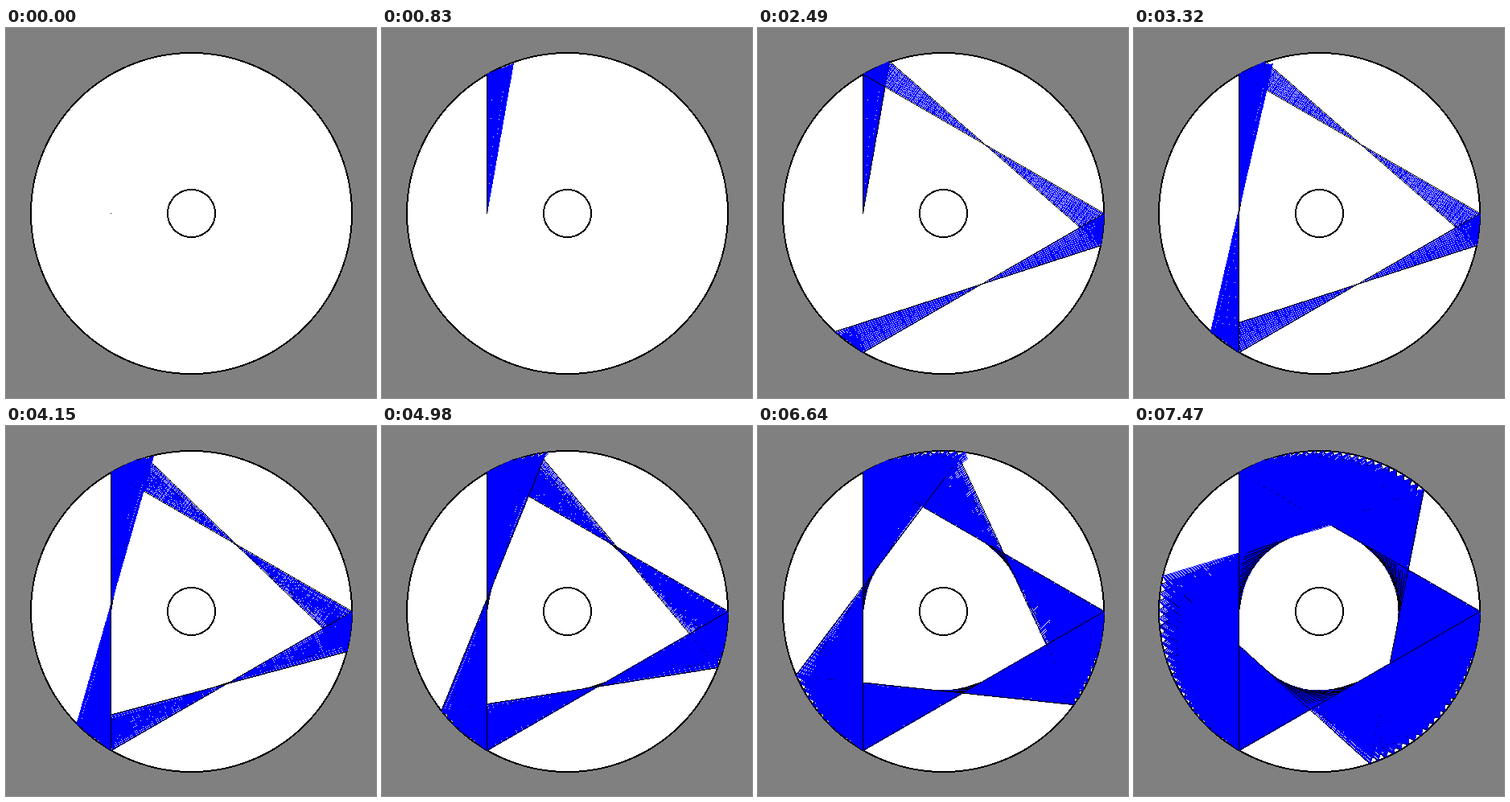
Animation, 460 px wide and 460 px high, one loop 8.3 s. Source, as an HTML page with a canvas:

```html
<!DOCTYPE html>
<html lang="en">
<head>
<meta charset="utf-8">
<title>Circular billiard</title>
<style>
  html, body { margin: 0; width: 100%; height: 100%; overflow: hidden; background: #808080; }
  canvas { display: block; width: 460px; height: 460px; }
</style>
</head>
<body>
<canvas id="stage" width="460" height="460"></canvas>
<script>
const SIZE = 460, CENTER = 230, RADIUS = 200, INNER = 30;
const STILL_MS = 830;
const WALL_REST = 20; // steps a ball rests at the wall before it leaves again
// Simulated steps reached in each still of the loop.
const STEPS = [0, 189, 592, 932, 1290, 2399, 4632, 7953, 10160, 23288];
const GRAY = 0xff808080, WHITE = 0xffffffff, BLACK = 0xff000000, BLUE = 0xffff0000; // ABGR

const ctx = document.getElementById('stage').getContext('2d');
const image = ctx.createImageData(SIZE, SIZE);
const pixels = new Uint32Array(image.data.buffer);

function plot(x, y, color) {
  pixels[y * SIZE + x] = color;
}

function line(a, b, color) {
  let [x, y] = a;
  const dx = Math.abs(b[0] - x), dy = -Math.abs(b[1] - y);
  const sx = x < b[0] ? 1 : -1, sy = y < b[1] ? 1 : -1;
  let err = dx + dy;
  for (;;) {
    plot(x, y, color);
    if (x === b[0] && y === b[1]) return;
    const twice = 2 * err;
    if (twice >= dy) { err += dy; x += sx; }
    if (twice <= dx) { err += dx; y += sy; }
  }
}

// A ball that leaves (-100, 0) at a given tilt from vertical and bounces inside the circle.
function makeBall(tilt) {
  const sin = Math.sin(tilt), cos = Math.cos(tilt), startX = -RADIUS / 2;
  const first = -startX * sin + Math.sqrt((startX * sin) ** 2 + RADIUS ** 2 - startX ** 2);
  const firstAngle = Math.atan2(first * cos, startX + first * sin);
  const turn = 2 * Math.acos(cos / 2);
  const chord = 2 * RADIUS * Math.sin(turn / 2);
  const period = chord + WALL_REST;
  const toPixel = (x, y) => [Math.round(CENTER + x), Math.round(CENTER - y)];

  // Point on the chord that starts at bounce k; part runs from 0 to 1.
  function onChord(k, part) {
    const from = firstAngle - k * turn, to = from - turn;
    const mix = f => RADIUS * (f(from) * (1 - part) + f(to) * part);
    return toPixel(mix(Math.cos), mix(Math.sin));
  }

  return {
    bounces: 0,
    bouncesAt: step => step < first ? 0 : Math.floor((step - first) / period) + 1,
    corner: n => n ? onChord(n - 1, 0) : toPixel(startX, 0),
    at(step) {
      if (step < first) return toPixel(startX + step * sin, step * cos);
      const k = Math.floor((step - first) / period);
      const moved = Math.max(0, step - first - k * period - WALL_REST);
      return onChord(k, moved / chord);
    }
  };
}

const balls = [makeBall(0), makeBall(Math.PI / 18)];

function drawTable() {
  const onRing = (r, radius) => r > radius - 1.5 && r < radius + 0.5;
  for (let y = 0; y < SIZE; y++) {
    for (let x = 0; x < SIZE; x++) {
      const r = Math.hypot(x - CENTER, y - CENTER);
      const rim = onRing(r, RADIUS) || onRing(r, INNER);
      plot(x, y, rim ? BLACK : r > RADIUS ? GRAY : WHITE);
    }
  }
  plot(...balls[0].at(0), BLACK);
}

let done = 0;

// Each step joins the balls in blue; a finished chord is traced in black.
function advance(step) {
  while (done < step) {
    done++;
    line(balls[0].at(done), balls[1].at(done), BLUE);
    for (const ball of balls) {
      const n = ball.bouncesAt(done);
      if (n > ball.bounces) line(ball.corner(n - 1), ball.corner(n), BLACK);
      ball.bounces = n;
    }
  }
}

drawTable();
const stills = STEPS.map(step => {
  advance(step);
  return new ImageData(image.data.slice(), SIZE, SIZE);
});

const start = performance.now();
let shown = -1;

function frame() {
  const index = Math.floor((performance.now() - start) / STILL_MS) % stills.length;
  if (index !== shown) ctx.putImageData(stills[shown = index], 0, 0);
  requestAnimationFrame(frame);
}
frame();
</script>
</body>
</html>
```
